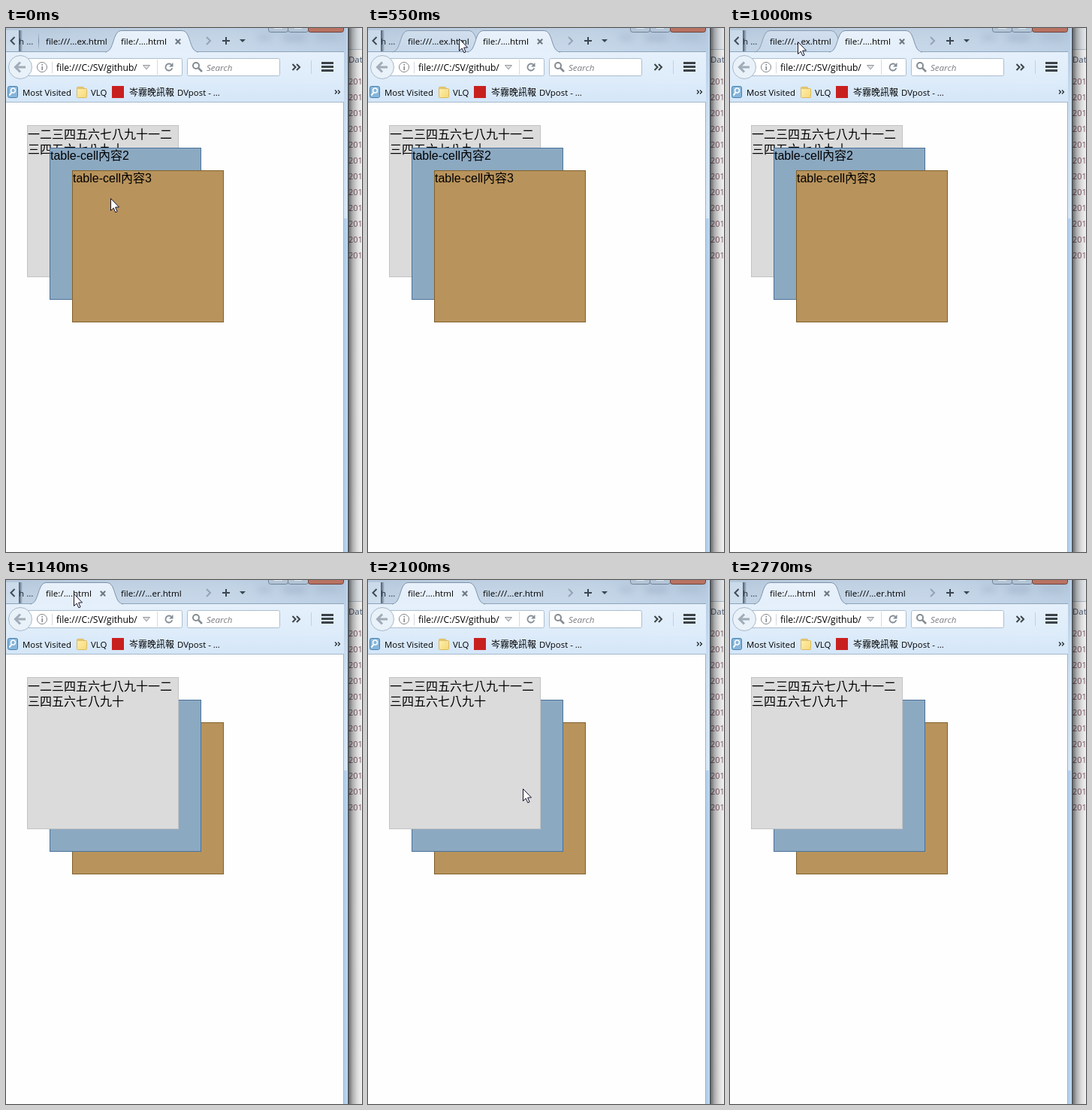
Animation, 474 px wide and 696 px high, one loop 3370 ms. Source, as an HTML page with a canvas:

```html
<!DOCTYPE html>
<html lang="en">
<head>
<meta charset="utf-8">
<title>Stacked cells</title>
<style>
html, body { margin: 0; width: 474px; height: 696px; overflow: hidden; }
canvas { display: block; }
</style>
</head>
<body>
<canvas id="stage" width="474" height="696"></canvas>
<script>
const g = document.getElementById('stage').getContext('2d');
const UI = '"Open Sans", "Noto Sans CJK TC", "Noto Sans CJK", sans-serif';
const PAGE = '"Liberation Sans", "Noto Sans CJK TC", "Noto Sans CJK", sans-serif';
const LOOP = 3370;
const SWITCH = 1140;

// time, pointer x, pointer y
const pointer = [
  [0, 139, 226], [160, 143, 229], [280, 132, 178], [420, 223, 186],
  [550, 121, 14], [700, 180, 37], [850, 90, 16], [1000, 90, 18],
  [1400, 95, 34], [1540, 181, 122], [1670, 126, 208], [1820, 168, 246],
  [1950, 206, 276], [2100, 206, 277], [2510, 312, 442], [2630, 394, 576],
  [2770, -50, -50]
];

const cells = [
  { x: 28, y: 129, fill: '#dbdbdb', edge: '#c3c3c3', lines: ['一二三四五六七八九十一二', '三四五六七八九十'] },
  { x: 58, y: 159, fill: '#8ca9c2', edge: '#4b7299', lines: ['table-cell內容2'] },
  { x: 88, y: 189, fill: '#b8935c', edge: '#80602b', lines: ['table-cell內容3'] }
];

function rect(x, y, w, h, fill) {
  g.fillStyle = fill;
  g.fillRect(x, y, w, h);
}

function fade(x0, y0, x1, y1, ...stops) {
  const grad = g.createLinearGradient(x0, y0, x1, y1);
  stops.forEach((c, i) => grad.addColorStop(i / (stops.length - 1), c));
  return grad;
}

function text(s, x, y, size, color = '#000', font = UI, style = '') {
  g.font = `${style} ${size}px ${font}`;
  g.fillStyle = color;
  g.fillText(s, x, y);
}

function line(points, color, width = 1, close = false) {
  g.beginPath();
  points.forEach(([x, y]) => g.lineTo(x, y));
  if (close) g.closePath();
  g.strokeStyle = color;
  g.lineWidth = width;
  g.stroke();
}

function poly(points, fill) {
  g.beginPath();
  points.forEach(([x, y]) => g.lineTo(x, y));
  g.closePath();
  g.fillStyle = fill;
  g.fill();
}

function arc(x, y, r, stroke, width = 1, fill, a = 0, b = 7) {
  g.beginPath();
  g.arc(x, y, r, a, Math.min(b, a + Math.PI * 2));
  if (fill) { g.fillStyle = fill; g.fill(); }
  g.strokeStyle = stroke;
  g.lineWidth = width;
  g.stroke();
}

function panel(x, y, w, h, r, fill, edge) {
  g.beginPath();
  g.roundRect(x + .5, y + .5, w - 1, h - 1, r);
  g.fillStyle = fill;
  g.fill();
  g.strokeStyle = edge;
  g.lineWidth = 1;
  g.stroke();
}

function chevron(x, y, w, h, color, width) {
  line([[x, y - h], [x + w, y], [x, y + h]], color, width);
}

function behind() {
  rect(450, 0, 24, 696, '#fff');
  rect(455, 0, 19, 28, '#f0f4f9');
  rect(455, 28, 19, 1, '#b9c6d6');
  text('Dat', 456, 46, 11.4, '#4c607a');
  for (let i = 0; i < 12; i++) text('201', 456, 75 + i * 21, 11, '#8b5f72');
  rect(455, 0, 19, 696, fade(455, 0, 474, 0, 'rgba(0,0,0,.66)', 'rgba(0,0,0,.32)', 'rgba(0,0,0,.14)', 'rgba(0,0,0,.05)'));
  rect(449, 0, 6, 253, fade(0, 0, 0, 253, '#b4c9e0', '#cfe1f3', '#d6e7f8'));
  rect(449, 253, 6, 443, '#b3d0ec');
  rect(449, 99, 1, 597, '#a3b3c4');
  rect(454, 0, 1, 696, '#d5eaf8');
  rect(455, 0, 1, 696, '#3c4752');
}

function blur(x, y, w, h, color) {
  g.save();
  g.filter = 'blur(4px)';
  rect(x, y, w, h, color);
  g.restore();
}

function frameTop() {
  rect(0, 0, 450, 32, fade(0, 0, 450, 0, '#b0c4d9', '#b9cce0', '#bacde1', '#a9bfd7'));
  rect(0, 0, 450, 32, fade(0, 0, 0, 32, 'rgba(255,255,255,.05)', 'rgba(220,235,250,.35)'));
  blur(336, 11, 16, 4, 'rgba(90,110,140,.28)');
  blur(370, 11, 28, 5, 'rgba(90,110,140,.28)');
  blur(414, 11, 28, 4, 'rgba(90,110,140,.2)');
  panel(349, -8, 27, 14, 3, '#b4c5d7', '#6f8194');
  panel(375, -8, 28, 14, 3, '#b4c5d7', '#6f8194');
  panel(402, -8, 48, 14, 3, '#b97362', '#6b4038');
  rect(357, 0, 11, 1, '#e6edf4');
  rect(384, 0, 10, 1, '#e6edf4');
}

function tabPath(x) {
  g.beginPath();
  g.moveTo(x, 32);
  g.bezierCurveTo(x + 13, 31, x + 9, 3.5, x + 22, 3.5);
  g.lineTo(x + 102, 3.5);
  g.bezierCurveTo(x + 115, 3.5, x + 111, 31, x + 124, 32);
}

function tab(x, fill, edge) {
  tabPath(x);
  g.fillStyle = fill;
  g.fill();
  g.strokeStyle = edge;
  g.lineWidth = 1;
  g.stroke();
}

function tabs(first, hover) {
  const ax = first ? 32 : 132;
  text('h ...', 17, 22, 11.6, '#1b2530');
  rect(0, 3, 18, 28, 'rgba(225,237,249,.45)');
  rect(17, 3, 5, 28, fade(17, 0, 22, 0, 'rgba(50,65,85,.85)', 'rgba(50,65,85,0)'));
  line([[11.5, 12], [6.5, 17], [11.5, 22]], '#3f4a55', 2);
  if (!first && !hover) rect(43, 7, 1, 21, fade(0, 7, 0, 28, 'rgba(90,110,135,.1)', 'rgba(90,110,135,.7)', 'rgba(90,110,135,.1)'));
  if (hover) tab(32, fade(0, 3, 0, 32, 'rgba(225,236,248,.55)', 'rgba(205,222,240,.45)'), 'rgba(105,125,150,.65)');
  rect(0, 31, 450, 1, '#8ea4ba');
  tab(ax, fade(0, 3, 0, 32, '#e9f1fa', '#e3effb'), '#7d92a8');
  rect(ax + 3, 31, 118, 2, '#e4effb');
  text(first ? 'file:/....html' : 'file:///...ex.html', 53, 22, 11.6);
  text(first ? 'file:///...er.html' : 'file:/....html', 153, 22, 11.6);
  const cx = ax + 97, r = 3.2;
  line([[cx - r, 18 - r], [cx + r, 18 + r]], '#6d7883', 2);
  line([[cx + r, 18 - r], [cx - r, 18 + r]], '#6d7883', 2);
  chevron(267, 17, 5, 5, '#94a4b5', 2);
  rect(288, 16, 10, 2, '#3b4652');
  rect(292, 12, 2, 10, '#3b4652');
  poly([[311, 15], [319, 15], [315, 19]], '#3b4652');
}

function navBar() {
  rect(0, 32, 450, 38, fade(0, 32, 0, 70, '#e5f0fb', '#deecfa'));
  panel(26, 40, 209, 24, 2, '#fff', '#adbdcd');
  arc(19, 52, 15.5, '#a9b9c9', 1, '#e9f1f9');
  line([[26, 52], [13, 52]], '#a0acb8', 3);
  line([[19, 45.5], [12.5, 52], [19, 58.5]], '#a0acb8', 3);
  arc(48, 52, 6.5, '#7f8487');
  rect(47.5, 48, 1.4, 1.6, '#75797c');
  rect(47.5, 51, 1.4, 5, '#75797c');
  rect(61, 45, 1, 15, '#d3d8dd');
  text('file:///C:/SV/github/', 67, 57, 12.1);
  const drop = [[182.5, 49.5], [191.5, 49.5], [187, 55]];
  poly(drop, '#dcdee0');
  line(drop, '#94989d', 1, true);
  rect(201, 42, 1, 20, '#d3dbe3');
  arc(217, 52, 4.5, '#808b96', 1.8, null, .3, 5.4);
  poly([[222.5, 46], [222.5, 51.5], [217, 51.5]], '#808b96');
  panel(241, 40, 124, 24, 2, '#fff', '#adbdcd');
  arc(253, 50, 4, '#858b91', 2);
  line([[256, 53], [261, 58]], '#858b91', 2.5);
  text('Search', 267, 57, 11.6, '#7a7d80', UI, 'italic');
  chevron(381.5, 52, 4, 4, '#3b4248', 2);
  chevron(387, 52, 4, 4, '#3b4248', 2);
  rect(406, 43, 1, 18, '#c3d0dd');
  for (let y = 45; y < 58; y += 5) rect(420, y, 16, 3, '#3b4248');
}

function bookmarks() {
  rect(0, 70, 450, 28, fade(0, 70, 0, 98, '#deecfa', '#d4e6f8'));
  rect(0, 98, 450, 1, '#a6b9cc');
  panel(2, 77, 14, 16, 2, '#86b6da', '#4a82ae');
  arc(9.5, 83, 3, '#fff', 1.5);
  line([[7.5, 85.5], [4.5, 89.5]], '#fff', 2);
  text('Most Visited', 22, 90, 11.4);
  panel(94, 78, 10, 14, 1, '#f0d57a', '#d6b455');
  panel(94, 80, 14, 13, 1, fade(94, 80, 108, 93, '#fff0ac', '#f4d877'), '#dcba5e');
  text('VLQ', 113, 90, 11.4);
  rect(141, 77, 16, 16, '#c8201f');
  text('岑霧晚訊報', 164, 90, 12);
  text('DVpost - ...', 228, 90, 11.4);
  chevron(438, 85, 2.5, 2.5, '#20262c', 1.2);
  chevron(442, 85, 2.5, 2.5, '#20262c', 1.2);
}

function cell({ x, y, fill, edge, lines }) {
  rect(x, y, 202, 202, edge);
  rect(x + 1, y + 1, 200, 200, fill);
  lines.forEach((s, i) => text(s, x + 1, y + (lines.length > 1 ? 18 : 16) + i * 20, 16, '#000', PAGE, '300'));
}

function arrow(x, y) {
  const shape = [[0, 0], [0, 16], [3.7, 12.6], [6.3, 18.3], [8.6, 17.3], [6.1, 11.6], [11, 11.4]]
    .map(([dx, dy]) => [x + dx + .5, y + dy + .5]);
  poly(shape, '#fff');
  line(shape, '#14142a', 1, true);
}

function draw(t) {
  const first = t >= SWITCH;
  const [, px, py] = pointer.findLast(p => p[0] <= t);
  const hover = !first && py < 32 && px > 40 && px < 140;
  rect(0, 0, 474, 696, '#fefefe');
  behind();
  frameTop();
  navBar();
  tabs(first, hover);
  bookmarks();
  (first ? [...cells].reverse() : cells).forEach(cell);
  arrow(px, py);
}

function tick() {
  draw(performance.now() % LOOP);
  requestAnimationFrame(tick);
}
tick();
</script>
</body>
</html>
```
